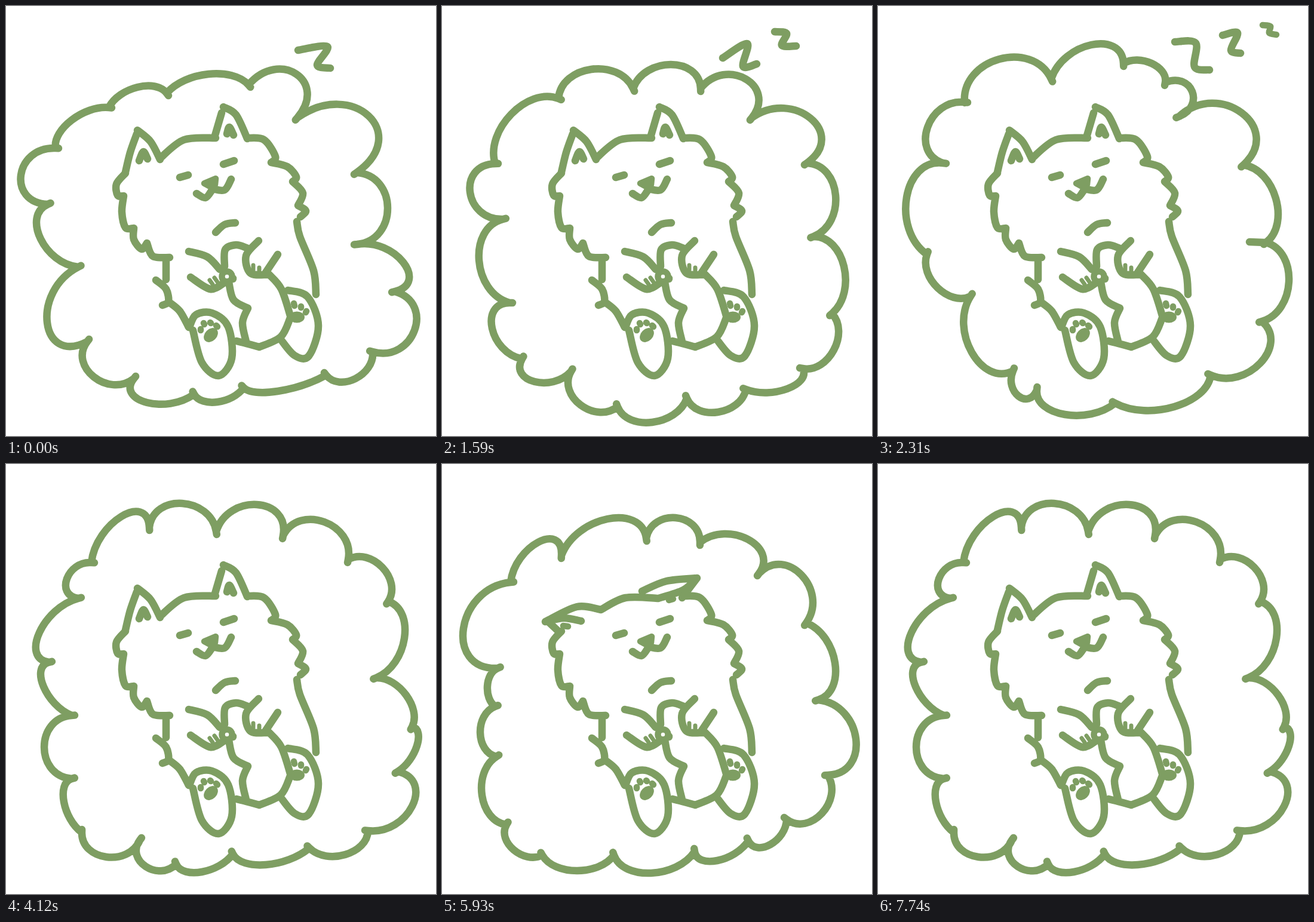
Write an HTML page that moves like this. It is 720 px wide and 720 px high and loops after 8 s.

```html
<!DOCTYPE html>
<html lang="en">
<head>
<meta charset="utf-8">
<title>Napping pup</title>
<style>
html, body { margin: 0; width: 100%; height: 100%; overflow: hidden; background: #fff; }
svg { display: block; width: 100%; height: 100%; fill: none; stroke: #7e9e62; stroke-width: 12.5; stroke-linecap: round; stroke-linejoin: round; }
.thin { stroke-width: 7; }
.mid { stroke-width: 10.5; }
.solid { fill: #7e9e62; stroke: none; }

/* each pose is held, then swapped without blending */
.one, .two, .three, .four, .five, .up { visibility: hidden; animation: 8s step-end infinite; }
.one { animation-name: one; }
.two { animation-name: two; }
.three { animation-name: three; }
.four { animation-name: four; }
.five { animation-name: five; }
.up { animation-name: up; }
@keyframes one { 0% { visibility: visible } 6.25%, 100% { visibility: hidden } }
@keyframes two { 0% { visibility: hidden } 6.25% { visibility: visible } 28.875%, 100% { visibility: hidden } }
@keyframes three { 0% { visibility: hidden } 28.875% { visibility: visible } 51.5%, 100% { visibility: hidden } }
@keyframes four { 0% { visibility: hidden } 51.5% { visibility: visible } 74.125% { visibility: hidden } 96.75%, 100% { visibility: visible } }
@keyframes five { 0% { visibility: hidden } 74.125% { visibility: visible } 96.75%, 100% { visibility: hidden } }
@keyframes up { 0% { visibility: visible } 74.125% { visibility: hidden } 96.75%, 100% { visibility: visible } }
</style>
</head>
<body>
<svg id="stage" viewBox="0 0 720 720">
  <path class="mid" fill="#7e9e62" d="M332 297L351 289L350 299L343 303Z"/>
  <circle class="mid" cx="370" cy="453" r="8.5"/>
  <ellipse class="solid" cx="343" cy="551" rx="13.5" ry="10" transform="rotate(-45 343 551)"/>
  <ellipse class="solid" cx="487" cy="521" rx="13" ry="9.5"/>
</svg>
<script>
const stage = document.getElementById('stage');

function addPath(cls, d) {
  const path = document.createElementNS(stage.namespaceURI, 'path');
  path.setAttribute('class', cls);
  path.setAttribute('d', d);
  stage.append(path);
}

function points(text) {
  const n = text.trim().split(/\s+/).map(Number), out = [];
  for (let i = 0; i < n.length; i += 2) out.push([n[i], n[i + 1]]);
  return out;
}

// Smooth curve through the given points
function spline(p) {
  let d = 'M' + p[0];
  for (let i = 1; i < p.length; i++) {
    const a = p[i - 1], b = p[i], before = p[i - 2] || a, after = p[i + 1] || b;
    const c1 = a.map((v, k) => v + (b[k] - before[k]) / 6);
    const c2 = b.map((v, k) => v - (after[k] - a[k]) / 6);
    d += 'C' + [c1, c2, b];
  }
  return d;
}

function ink(cls, ...strokes) {
  addPath(cls, strokes.map(s => spline(points(s))).join(''));
}

// Puffs run cusp, apex, cusp, apex, ...; tall ones get fuller shoulders
// and every stroke runs slightly past its cusp.
function cloud(cls, text) {
  const p = points(text);
  let d = 'M' + p[0];
  for (let i = 0; i + 2 < p.length; i += 2) {
    const [a, top, b] = p.slice(i, i + 3);
    const m = [(a[0] + b[0]) / 2, (a[1] + b[1]) / 2];
    const rise = Math.hypot(top[0] - m[0], top[1] - m[1]);
    const half = Math.hypot(a[0] - m[0], a[1] - m[1]);
    const full = (1 + 2 * Math.min(1, rise / half)) / 3;
    const ctrl = e => m.map((v, k) => v + full * (e[k] - v) + (top[k] - v) * 4 / 3);
    const c2 = ctrl(b), len = Math.hypot(b[0] - c2[0], b[1] - c2[1]);
    const tail = b.map((v, k) => v + 5 * (v - c2[k]) / len);
    d += 'C' + [ctrl(a), c2, b] + 'L' + tail + 'L' + b;
  }
  addPath(cls, d);
}

cloud('one', `83 238 110 191 172 170 220 136 269 146 339 114 406 132 486 114
  488 187 607 184 587 279 639 338 588 399 665 429 651 478 684 543 614 579
  585 624 536 618 455 645 398 639 354 663 315 650 236 664 214 624 147 621
  136 562 69 530 121 437 58 390 70 332 25 283 83 238`);
ink('one', '489 74 538 68 521 99 543 104');

cloud('two', `89 264 116 181 195 155 250 106 320 138 383 98 433 138 508 122
  519 187 617 188 611 263 659 317 622 386 673 436 653 515 656 576 604 607
  578 641 509 642 462 680 410 657 352 697 294 671 232 668 216 612 155 629
  134 591 84 540 113 497 62 426 102 357 47 312 89 264`);
ink('two', '470 87 511 63 504 101 527 97', '557 43 577 46 569 66 593 67');

cloud('three', `145 162 203 89 290 122 357 65 411 96 458 96 481 128 526 143
  504 185 609 179 612 266 666 322 650 396 688 462 643 528 640 598 557 618
  496 671 397 665 313 684 266 643 235 653 226 611 157 580 155 486 100 472
  82 416 48 320 109 263 83 203 145 161`);
ink('three', '622 395 648 396', '497 60 532 62 530 102 555 107', '577 49 602 45 591 74 607 79');
ink('three mid', '644 32 657 34 655 45 667 48');

cloud('four', `143 165 193 88 240 106 295 66 352 113 420 68 464 120 533 97
  573 160 630 173 640 230 667 292 620 358 670 387 680 440 688 472 656 515
  680 573 606 614 568 654 508 643 435 671 380 653 328 683 285 670 234 674
  224 630 168 658 127 617 97 566 110 527 64 474 110 421 63 373 72 332
  56 282 121 225 102 192 143 165`);

cloud('five', `115 198 161 131 200 153 277 92 342 124 391 90 432 131 512 126
  531 183 602 186 610 266 658 333 630 395 693 460 646 521 636 585 577 595
  550 637 513 631 461 664 423 649 350 685 288 655 226 681 168 655 120 646
  108 604 67 555 91 490 64 450 89 406 76 372 93 342 36 275 115 198`);

// ears, raised and folded
ink('up', '258 257 242 227 220 208', '219 214 208 245 200 278', '258 255 298 224 351 221',
  '349 220 361 179', '364 169 385 182 404 222', '223 259 230 244 237 256', '370 214 374 203 381 216');
ink('five', '266 244 226 239 173 264', '173 264 204 258 233 263', '180 266 197 282',
  '266 244 307 224 362 225', '335 213 376 196 427 191', '427 191 404 211 362 225', '427 191 402 224');
ink('five mid', '203 271 211 272', '380 228 387 226');

// cheeks and face
ink('fur', '200 280 185 298 187 317 197 318', '197 318 194 345 200 371 214 372',
  '214 372 214 391 227 407 236 397', '236 397 246 419 274 421');
ink('fur', '404 221 432 224 451 252 444 262', '444 262 471 269 486 286 480 294',
  '480 294 497 313 489 334', '489 334 502 343 493 353');
ink('face', '291 287 305 283', '364 265 382 259', '319 314 334 321 345 308',
  '346 306 366 308 377 290', '351 379 366 366 384 363');

// body, arms, tail
ink('body', '487 361 492 386 515 443 519 483', '268 428 268 458',
  '251 459 268 474 272 495 262 501', '272 495 291 511 306 538');
ink('arms', '306 411 337 420 358 441', '309 454 342 474 366 463',
  '423 393 402 418 409 447 438 450', '455 416 433 449');
ink('thin', '341 459 346 466', '349 455 354 462', '414 434 414 442', '424 438 424 445');
ink('tail', '366 436 367 408 385 400 403 405', '373 462 381 492 405 506', '405 506 396 530 402 562',
  '386 561 402 565 424 571', '424 571 460 554 476 522', '440 449 461 474 477 522', '380 456 380 457');

// feet
ink('foot', '307 538 318 517 345 514 372 537 378 590 356 619 328 597 313 543');
ink('foot', '472 476 505 487 523 535 507 586 483 585 459 557');
ink('mid', '326 541 326 543', '331 531 332 533', '342 530 343 531', '352 535 354 537',
  '482 498 483 502', '494 503 494 505', '503 511 502 513');
</script>
</body>
</html>
```
